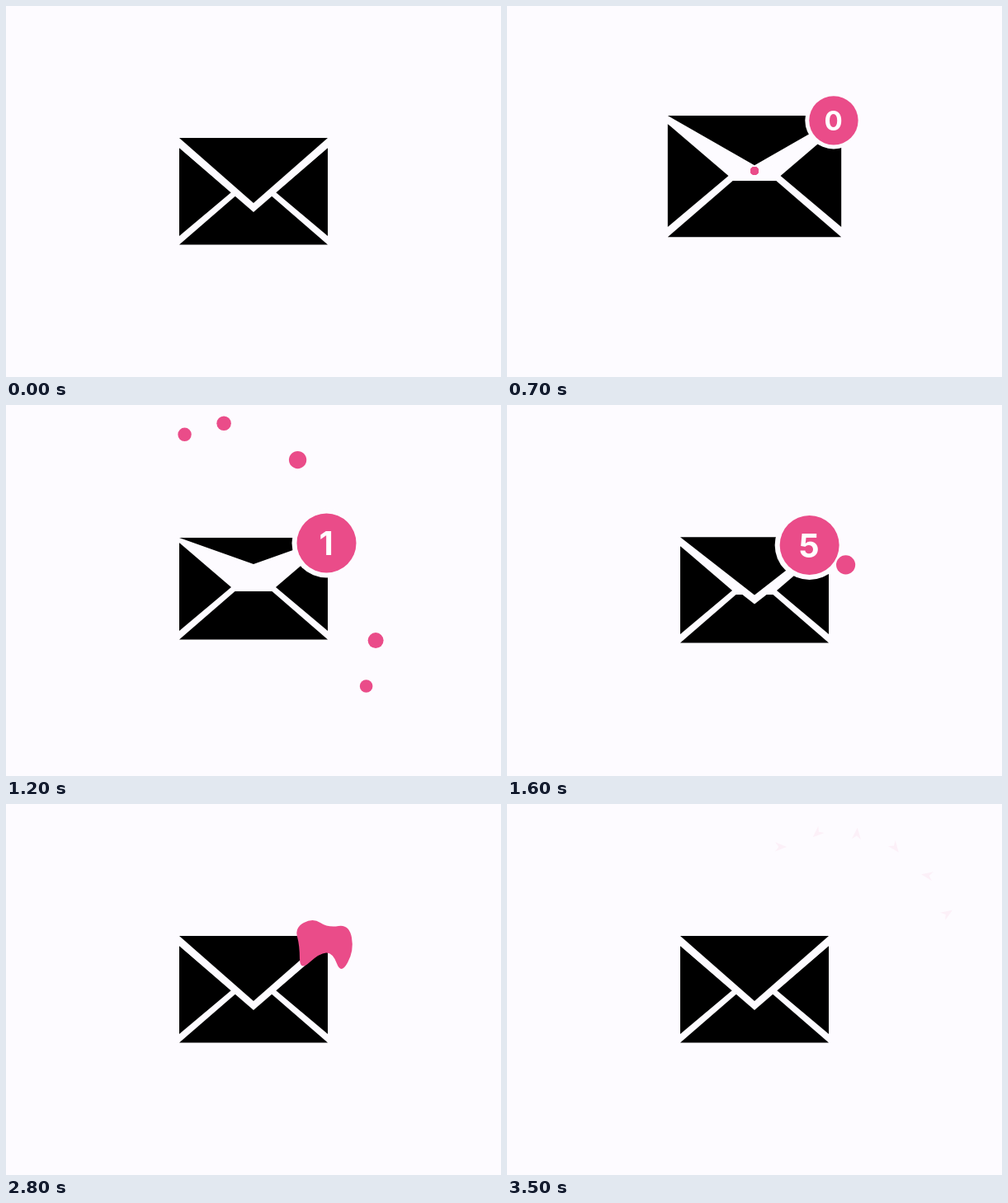
An HTML page with a canvas that plays this animation: 600 px wide and 450 px high, repeating every 4200 ms.

```html
<!DOCTYPE html>
<html lang="en">
<head>
<meta charset="utf-8">
<title>Mail badge</title>
<style>
  html, body { margin: 0; width: 100%; height: 100%; overflow: hidden; background: #fdfbff; }
  canvas { display: block; }
</style>
</head>
<body>
<canvas id="stage" width="600" height="450"></canvas>
<script>
const ctx = document.getElementById('stage').getContext('2d');
const LOOP = 4200, STEP = 100, POP = 2800;
const PINK = '#ea4c89', PAPER = '#fdfbff', INK = '#000';
const BADGE = { x: 388.5, y: 172.5, r: 36 };
const BOTTOM = 289.5;

// Where the dots are once they have left the envelope, in order of arrival.
const dots = [[400.5, 252], [190.5, 174], [330, 274], [173, 164], [151, 184], [334, 321]];
const arrival = i => 1200 + 100 * i;

const splat = [
  [350, 150], [372, 138], [390, 150], [416, 146], [422, 178],
  [406, 207], [396, 180], [380, 181], [356, 203], [356, 172]
];

const span = (t, from, to) => Math.max(0, Math.min(1, (t - from) / (to - from)));
const smooth = u => u * u * (3 - 2 * u);
const easeOut = u => 1 - (1 - u) ** 3;
const easeBack = u => 1 + 2.7 * (u - 1) ** 3 + 1.7 * (u - 1) ** 2;

const flapOpen = t => smooth(span(t, 450, 900)) - smooth(span(t, 1200, 1750));

function envelopeScale(t) {
  return 1 - .25 * smooth(span(t, 0, 500))
    + .435 * easeOut(span(t, 500, 800))
    - .185 * smooth(span(t, 800, 1200));
}

// The arriving dots push the badge left, then it springs back.
function badgePush(t) {
  const u = Math.max(0, t - 1800);
  return 29.5 * smooth(span(t, 1200, 1800)) * Math.exp(-u / 90) * Math.cos(Math.PI * u / 300);
}

function poly(color, ...points) {
  ctx.fillStyle = color;
  ctx.beginPath();
  points.forEach(p => ctx.lineTo(...p));
  ctx.fill();
}

function circle(color, x, y, r) {
  ctx.fillStyle = color;
  ctx.beginPath();
  ctx.arc(x, y, r, 0, Math.PI * 2);
  ctx.fill();
}

function drawEnvelope(open) {
  const top = 160 + 6 * open, tip = 239 - 41 * open;
  poly(INK, [210, 172], [273, 226], [210, 279]);
  poly(INK, [390, 172], [327, 226], [390, 279]);
  poly(INK, [210, BOTTOM], [277.5, 231], [322.5, 231], [390, BOTTOM]);
  poly(PAPER, [210, 160], [390, 160], [390, 172], [300, tip + 11], [210, 172]);
  poly(INK, [210, top], [390, top], [300, tip]);
}

function drawBadge(t, scale) {
  const count = dots.filter((_, i) => t >= arrival(i)).length;
  const push = badgePush(t), size = easeBack(span(t, 650, 900));
  ctx.save();
  ctx.translate(BADGE.x - push - 38 * (scale - 1), BADGE.y - .07 * push - 24 * (scale - 1));
  ctx.scale(size, size);
  circle(PAPER, 0, 0, BADGE.r + 6);
  circle(PINK, 0, 0, BADGE.r);
  ctx.fillStyle = '#fff';
  ctx.textAlign = 'center';
  ctx.font = count === dots.length ? '900 41px Lato, sans-serif' : '700 40px Inter, sans-serif';
  ctx.fillText(count, -.5, 14.5);
  ctx.restore();
}

// Dots burst out of the envelope, then spiral into the badge.
function drawDots(t) {
  dots.forEach(([x, y], i) => {
    if (t < 700 || t >= arrival(i)) return;
    const out = easeOut(span(t, 700, 900)), u = span(t, 900, arrival(i));
    const dx = x - BADGE.x, dy = y - BADGE.y, far = Math.hypot(dx, dy);
    const turn = x < 300 ? 1.68 : -1.68;
    const angle = Math.atan2(dy, dx) + turn * u;
    const r = far * (1 - u ** 2.4) + (85 - .3 * far) * Math.sin(Math.PI * u) ** 2;
    const px = BADGE.x - badgePush(t) + r * Math.cos(angle);
    const py = BADGE.y + r * Math.sin(angle);
    circle(PINK, 300 + (px - 300) * out, 200 + (py - 200) * out, 5 + 7.5 * u);
  });
}

// Smooth closed shape through the midpoints of its corners.
function drawSplat(size) {
  const mid = (a, b) => [(a[0] + b[0]) / 2, (a[1] + b[1]) / 2];
  ctx.save();
  ctx.translate(387, 166);
  ctx.scale(size, size);
  ctx.translate(-387, -166);
  ctx.fillStyle = PINK;
  ctx.beginPath();
  ctx.moveTo(...mid(splat[splat.length - 1], splat[0]));
  splat.forEach((p, i) => ctx.quadraticCurveTo(...p, ...mid(p, splat[(i + 1) % splat.length])));
  ctx.fill();
  ctx.restore();
}

function drawShards(t) {
  const fly = span(t, POP, 3500) ** 1.5, s = 13 - 6 * fly;
  ctx.globalAlpha = 1 - .94 * fly ** 2;
  for (let i = 0; i < dots.length; i++) {
    const angle = -2.02 + .355 * i, r = (130 + 4 * i) * fly;
    ctx.save();
    ctx.translate(BADGE.x + r * Math.cos(angle), 169 + r * Math.sin(angle));
    ctx.rotate(2.4 * i + 3 * (1 - fly));
    poly(PINK, [s, 0], [-s, s * .8], [-s * .4, 0], [-s, -s * .8]);
    ctx.restore();
  }
  ctx.globalAlpha = 1;
}

function draw(t) {
  const scale = envelopeScale(t), open = flapOpen(t);
  const lift = 5 * open + Math.max(37 * (scale - 1), 5 * (1 - scale));
  ctx.fillStyle = PAPER;
  ctx.fillRect(0, 0, 600, 450);
  ctx.save();
  ctx.translate(300, BOTTOM - lift);
  ctx.scale(scale, scale);
  ctx.translate(-300, -BOTTOM);
  drawEnvelope(open);
  if (t >= 700 && t < POP) drawBadge(t, scale);
  ctx.restore();
  drawDots(t);
  if (t >= POP && t < POP + 200) drawSplat(1 - .3 * span(t, POP, POP + 100));
  if (t > POP) drawShards(t);
}

const start = performance.now();
function tick() {
  const t = (performance.now() - start) % LOOP;
  draw(Math.floor(t / STEP) * STEP);
  requestAnimationFrame(tick);
}
tick();
</script>
</body>
</html>
```
